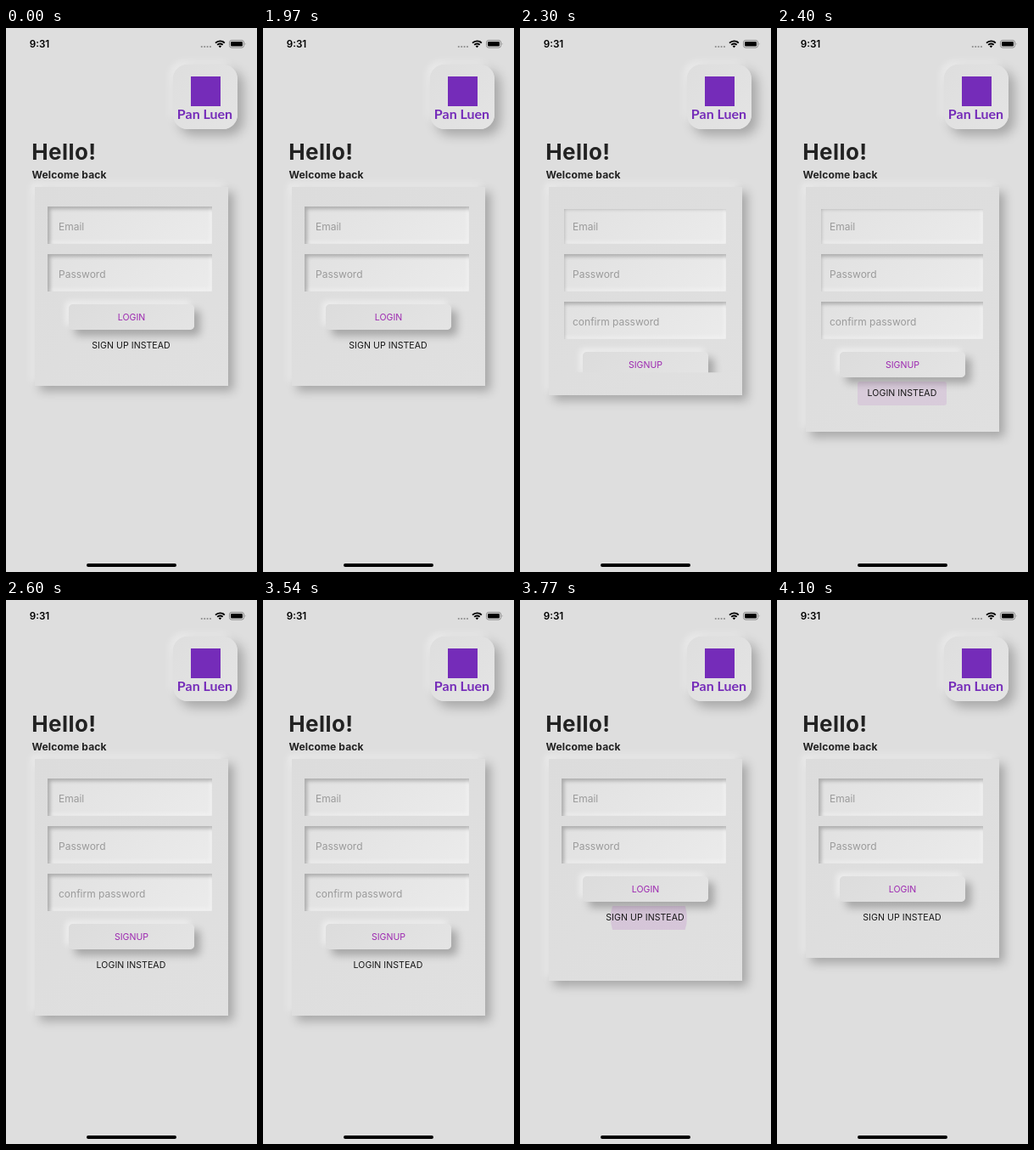
An HTML page for the animation above (4120 ms loop, 296 by 640 pixels).

```html
<!DOCTYPE html>
<html lang="en">
<head>
<meta charset="utf-8">
<title>Login form</title>
<style>
  html, body { margin: 0; width: 100%; height: 100%; overflow: hidden; background: #dedede; }
  #stage { position: relative; width: 296px; height: 640px; overflow: hidden; background: #dedede; font-family: Inter, sans-serif; }
  #stage div { position: absolute; box-sizing: border-box; }
  #stage svg { position: absolute; left: 0; top: 0; }
  .tile {
    left: 197px; top: 43px; width: 76px; height: 76px; border-radius: 17px;
    background: linear-gradient(135deg, #dedede, #e4e4e4);
    box-shadow: 7px 7px 13px rgba(0,0,0,.25), -4px -4px 9px rgba(255,255,255,.4);
  }
  #card {
    left: 34px; top: 187px; width: 228px;
    background: linear-gradient(135deg, #dcdcdc, #e0e0e0);
    box-shadow: 6px 6px 11px rgba(0,0,0,.26), -4px -4px 8px rgba(255,255,255,.45);
  }
  #content { left: 0; top: 0; width: 296px; height: 640px; }
  .field {
    left: 49px; width: 194px; height: 44px; padding-left: 13px;
    font-size: 12px; line-height: 47px; color: #9b9b9b; white-space: nowrap;
    background: linear-gradient(135deg, #e1e1e1, #ebebeb);
    box-shadow: inset 3px 3px 4px rgba(0,0,0,.24), inset -3px -3px 4px rgba(255,255,255,.3);
  }
  #button, #linkText { font-size: 10.55px; text-align: center; white-space: nowrap; }
  #button {
    left: 74px; width: 148px; height: 30px; border-radius: 5px; line-height: 31px; color: #9c27b0;
    background: linear-gradient(135deg, #dcdcdc, #e4e4e4);
    box-shadow: 7px 7px 10px rgba(0,0,0,.25), -4px -4px 7px rgba(255,255,255,.5);
  }
  #link { left: 95px; width: 105px; height: 28px; border-radius: 3px; overflow: hidden; }
  #linkText { left: 45px; width: 205px; line-height: 28px; letter-spacing: .07px; color: #151515; }
  #ripple { left: 56.5px; top: 14px; border-radius: 50%; background: #9c27b0; transform: translate(-50%, -50%); }
</style>
</head>
<body>
<div id="stage">
  <div class="tile"></div>
  <div id="card"></div>
  <div id="content">
    <div class="field" style="top:210px">Email</div>
    <div class="field" style="top:266px">Password</div>
    <div class="field" style="top:322px" id="confirm">confirm password</div>
    <div id="button"></div>
    <div id="link"><div id="ripple"></div></div>
    <div id="linkText"></div>
  </div>
  <svg width="296" height="640" viewBox="0 0 296 640" font-family="Inter, sans-serif">
    <text x="27.7" y="23" font-size="11.7" font-weight="600">9:31</text>
    <path d="M230.8 22h10.4" stroke="#8f8f8f" stroke-width="2.2" stroke-linecap="round" stroke-dasharray="0 3.4"/>
    <path d="M247 17.6a7.6 7.6 0 0 1 10.8 0M249.2 19.9a4.5 4.5 0 0 1 6.4 0" fill="none" stroke="#000" stroke-width="1.9"/>
    <path d="M250.7 21.4a2.5 2.5 0 0 1 3.4 0l-1.7 1.8z"/>
    <rect x="263.5" y="14.5" width="17" height="8.6" rx="2.5" fill="none" stroke="#8a8a8a"/>
    <rect x="265" y="16" width="14" height="5.6" rx="1.3"/>
    <path d="M281.8 17.3q1.6 1.5 0 3z" fill="#8a8a8a"/>
    <rect x="218" y="57" width="35" height="35" fill="#752cb9"/>
    <text x="234.5" y="107" font-family="Lato, sans-serif" font-size="16" font-weight="700" fill="#752cb9" text-anchor="middle">Pan Luen</text>
    <g fill="#222" font-weight="700">
      <text x="30.3" y="155" font-size="26" letter-spacing=".4">Hello!</text>
      <text x="30.5" y="177" font-size="12.1" letter-spacing=".1">Welcome back</text>
    </g>
    <rect x="95" y="630" width="106" height="4" rx="2"/>
  </svg>
</div>
<script>
const LOOP = 4120, RESIZE = 300;
const LOW = 421, HIGH = 489, CARD_TOP = 187;

// Each tap refreshes the picture every `step` ms and swaps the form after `swap` ms.
const openTap = { at: 1970, step: 105, frames: 6, swap: 273, signUp: true };
const closeTap = { at: 3540, step: 110, frames: 5, swap: 115, signUp: false };

const $ = id => document.getElementById(id);
const clamp = x => Math.min(1, Math.max(0, x));
const bezier = (s, a, b) => 3 * s * (1 - s) ** 2 * a + 3 * s * s * (1 - s) * b + s ** 3;

// The standard "ease" curve, solved by bisection.
function ease(x) {
  let low = 0, high = 1;
  for (let i = 0; i < 20; i++) {
    const mid = (low + high) / 2;
    if (bezier(mid, 0.25, 0.25) < x) low = mid; else high = mid;
  }
  return bezier(high, 0.1, 1);
}

function draw(time) {
  const tap = time >= openTap.at && time < closeTap.at ? openTap : closeTap;
  const age = (time - tap.at + LOOP) % LOOP;
  const elapsed = Math.min(Math.floor(age / tap.step), tap.frames) * tap.step;
  const sinceSwap = elapsed - tap.swap;
  const signUp = tap.signUp === (sinceSwap >= 0);
  const progress = clamp(sinceSwap / RESIZE);
  const grown = tap.signUp ? ease(progress) : 1 - ease(progress);
  const bottom = LOW + (HIGH - LOW) * grown;
  const shift = signUp ? 56 : 0;

  $('card').style.height = bottom - CARD_TOP + 'px';
  // Only a growing card is smaller than its content and cuts it off.
  const growing = tap.signUp && progress > 0 && progress < 1;
  $('content').style.clipPath = growing ? `inset(213px 52px ${640 - bottom + 27}px 52px)` : 'none';

  $('confirm').style.display = signUp ? 'block' : 'none';
  $('button').textContent = signUp ? 'SIGNUP' : 'LOGIN';
  $('linkText').textContent = signUp ? 'LOGIN INSTEAD' : 'SIGN UP INSTEAD';
  $('button').style.top = 325 + shift + 'px';
  $('link').style.top = $('linkText').style.top = 360 + shift + 'px';

  const ripple = $('ripple').style;
  ripple.width = ripple.height = 2 * Math.min(62, elapsed * 0.205) + 'px';
  ripple.opacity = 0.18 * (1 - clamp(sinceSwap / (tap.frames * tap.step - tap.swap)));
}

const start = performance.now();
function tick() {
  draw((performance.now() - start) % LOOP);
  requestAnimationFrame(tick);
}
tick();
</script>
</body>
</html>
```
